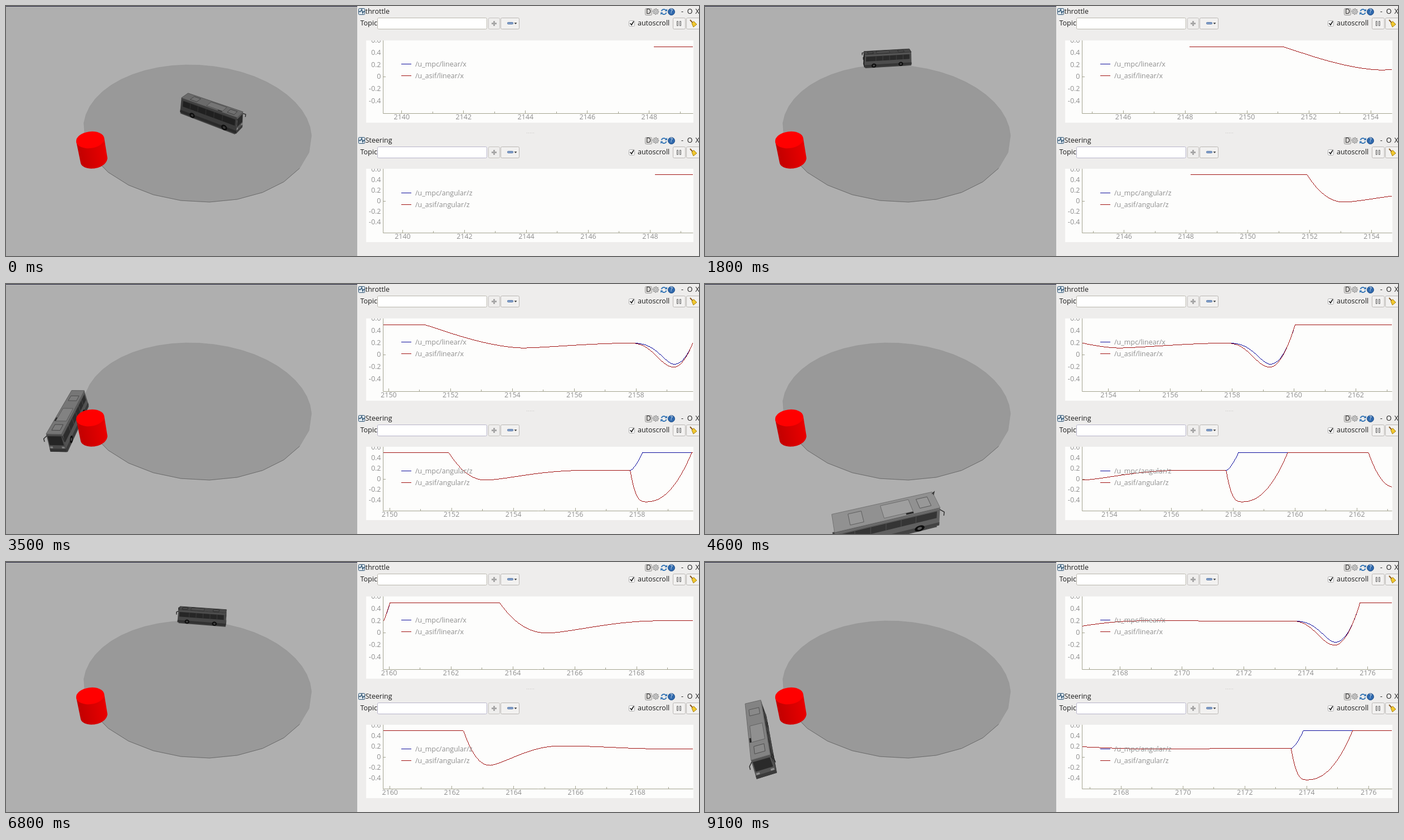
Recreate the animation shown at these times as an HTML page with a canvas. Size 1243 by 450 pixels, loop 9150 ms.

```html
<!DOCTYPE html>
<html>
<head>
<meta charset="utf-8">
<style>
html, body { margin: 0; width: 100%; height: 100%; overflow: hidden; background: #eeedec; }
canvas { display: block; }
</style>
</head>
<body>
<canvas id="stage" width="1243" height="450"></canvas>
<script>
const g = document.getElementById('stage').getContext('2d');
const LOOP = 9150, STEP = 50, TAU = 2 * Math.PI;
const FONT = '"Open Sans", "Noto Sans", sans-serif';

// ---------- helpers ----------
const grey = v => { v = Math.round(v); return `rgb(${v},${v},${v})`; };
const ring = (n, f) => Array.from({ length: n }, (_, k) => f(k * TAU / n, k));

function text(str, x, y, color = '#1c1c1c', align = 'left', size = 12.5) {
  g.font = `${size}px ${FONT}`;
  g.fillStyle = color;
  g.textAlign = align;
  g.textBaseline = 'middle';
  g.fillText(str, x, y);
}

function poly(points, fill, stroke, width = 1) {
  g.beginPath();
  points.forEach(([x, y]) => g.lineTo(x, y));
  g.closePath();
  if (fill) { g.fillStyle = fill; g.fill(); }
  if (stroke) { g.strokeStyle = stroke; g.lineWidth = width; g.stroke(); }
}

function line(points, color, width = 1) {
  g.beginPath();
  points.forEach(([x, y]) => g.lineTo(x, y));
  g.strokeStyle = color;
  g.lineWidth = width;
  g.stroke();
}

function box(x, y, w, h, fill, stroke, r = 2) {
  g.beginPath();
  g.roundRect(x + .5, y + .5, w, h, r);
  g.fillStyle = fill;
  g.fill();
  if (stroke) { g.strokeStyle = stroke; g.lineWidth = 1; g.stroke(); }
}

function clip(x, y, w, h) {
  g.save();
  g.beginPath();
  g.rect(x, y, w, h);
  g.clip();
}

// ---------- camera: unit height, pitched down ----------
const F = 543, CP = Math.cos(.6283), SP = Math.sin(.6283);

function project(x, z, h) {
  const depth = z * CP + (1 - h) * SP;
  return [315 + F * x / depth, 225 + F * ((1 - h) * CP - z * SP) / depth];
}

// ---------- bus route: time, ground x, ground z, heading ----------
const firstTurn = k => {
  const a = -.617 + 1.17 * k;
  return [350 * k, .434 + .46 * Math.sin(a), 1.857 - .46 * Math.cos(a), a];
};
const passObstacle = lap => [
  [2650, -.522, 1.853, 4.379],
  [3500, -.57, 1.215, 4.692],
  [3900, -.526, .938, 5.116]
].map(([t, x, z, a]) => [t + 5200 * lap, x, z, a + TAU * lap]);

const ROUTE = [
  ...[0, 1, 2, 3].map(firstTurn),
  [1800, .054, 2.285, 3.29],
  ...passObstacle(0),
  [4600, .02, .631, 6.543],
  [5800, .704, 1.668, 7.983],
  ...passObstacle(1)
];

// Cubic arcs whose tangent length follows the turn angle.
function pose(t) {
  const i = Math.max(1, ROUTE.findIndex(p => p[0] >= t));
  const [t0, x0, z0, a0] = ROUTE[i - 1], [t1, x1, z1, a1] = ROUTE[i];
  const s = (t - t0) / (t1 - t0);
  const m = Math.hypot(x1 - x0, z1 - z0) / Math.cos((a1 - a0) / 4) ** 2;
  const curve = (p, q, u, v) => {
    const b = 3 * (q - p) - 2 * u - v, c = 2 * (p - q) + u + v;
    return [p + s * (u + s * (b + s * c)), u + s * (2 * b + 3 * s * c)];
  };
  const [x, dx] = curve(x0, x1, m * Math.cos(a0), m * Math.cos(a1));
  const [z, dz] = curve(z0, z1, m * Math.sin(a0), m * Math.sin(a1));
  return { x, z, a: Math.atan2(dz, dx) };
}

// ---------- bus ----------
const LEN = .38, WID = .077, TALL = .11;

function drawBus(t) {
  const { x, z, a } = pose(t), c = Math.cos(a), s = Math.sin(a);
  const at = (l, w, h) => project(x + l * LEN * c - w * WID * s, z + l * LEN * s + w * WID * c, h * TALL);
  const rect = (f, u0, u1, v0, v1, fill, stroke) =>
    poly([f(u0, v0), f(u1, v0), f(u1, v1), f(u0, v1)], fill, stroke);
  const roof = (u, v) => at(u, v, 1);
  const top = 128 + 45 * (1 - z);

  rect((u, v) => at(u, v, 0), -.5, .48, -.5, .5, 'rgba(25,25,25,.7)');

  // sides and ends; u runs along the face, v upwards
  const faces = [
    ...[-1, 1].map(d => ({ n: [-s * d, c * d], side: true, f: (u, v) => at(u * (1 - .04 * v), d * (.5 - .05 * v), .07 + .93 * v) })),
    ...[-1, 1].map(d => ({ n: [c * d, s * d], front: d > 0, f: (u, v) => at(d * (.5 - .02 * v), u * (1 - .1 * v), .07 + .93 * v) }))
  ];
  for (const { n, side, front, f } of faces) {
    const reach = (side ? WID : LEN) / 2;
    if (n[0] * x + n[1] * z + reach >= 0) continue;
    const tone = 60 + 22 * n[0] - 14 * n[1] + 45 * Math.max(0, 1 - z);
    const pane = (u0, u1, v0, v1, k) => rect(f, u0, u1, v0, v1, grey(tone * k));
    pane(-.5, .5, 0, 1, 1);
    pane(-.5, .5, 0, .18, .7);
    if (side) {
      pane(-.46, .47, .46, .83, .55);
      for (let u = -.32; u < .4; u += .145) line([f(u, .46), f(u, .83)], grey(tone * .85));
      line([f(-.5, .92), f(.5, .92)], grey(tone * 1.25));
      for (const u of [-.27, .3]) {
        const wheel = r => ring(16, q => f(u + r * TALL / LEN * Math.cos(q), .1 + r * Math.sin(q)));
        poly(wheel(.17), '#0d0d0d');
        poly(wheel(.08), grey(tone * .9));
      }
    } else {
      pane(-.44, .44, front ? .38 : .5, .88, .5);
      if (front) for (const u of [-.45, .28]) pane(u, u + .17, .2, .3, 1.7);
    }
  }

  rect(roof, -.48, .48, -.45, .45, grey(top), grey(top * .8));
  rect(roof, -.34, -.22, -.28, .28, grey(top * 1.05), grey(top * .65));
  rect(roof, -.04, .23, -.33, .33, grey(top * 1.1), grey(top * .75));
  rect(roof, .3, .41, -.25, .25, grey(top * 1.05), grey(top * .6));
  rect(roof, .16, .23, -.42, -.34, '#262626');

  for (const w of [-1, 1]) line([at(.48, w * .45, .9), at(.515, w * .58, .85), at(.515, w * .6, .68)], '#2a2a2a', 1.4);
}

// ---------- scene ----------
// The far half of the field is smoother than the near half.
const FIELD = ring(50, (q, k) => [q + 1.466, k])
  .filter(([q, k]) => k % 2 === 0 || Math.sin(q) < 0)
  .map(([q]) => [343.5 + 204.5 * Math.cos(q), 229.5 + 123.5 * Math.sin(q + .07)]);
const NEAR_EDGE = FIELD.filter(p => p[1] > 270).sort((p, q) => p[0] - q[0]);

function drawCylinder() {
  const shade = g.createLinearGradient(128, 268, 180, 258);
  shade.addColorStop(0, '#c00000');
  shade.addColorStop(.6, '#da0000');
  shade.addColorStop(1, '#ea0000');
  g.beginPath();
  g.moveTo(126, 244);
  g.lineTo(134, 283);
  g.bezierCurveTo(138, 298, 179, 296, 182, 274);
  g.lineTo(176, 237);
  g.fillStyle = shade;
  g.fill();
  g.beginPath();
  g.ellipse(151, 241, 25.3, 15, -.13, 0, 7);
  g.fillStyle = '#ff0000';
  g.fill();
}

function drawScene(t) {
  clip(0, 0, 630, 450);
  g.fillStyle = '#afafaf';
  g.fillRect(0, 0, 630, 450);
  poly(FIELD, '#999', '#909090', .6);
  line(NEAR_EDGE, '#666', .9);
  drawBus(t);
  drawCylinder();
  g.fillStyle = '#20203a';
  g.fillRect(0, 0, 630, 1);
  g.restore();
}

// ---------- plotted signals ----------
// Each leg: end time in seconds after 2148, value reached, and the bends a, b of its easing.
const ease = (s, a = 1, b = 1) => 1 - (1 - s ** a) ** b;
const FIRST = .14, LAP = 15.72;

function signal(before, dodge, after) {
  const again = dodge.map(([u, ...leg]) => [u + LAP, ...leg]);
  const legs = [[FIRST, .5], ...before, ...dodge, ...after, ...again, [40, .5]];
  return u => {
    const i = Math.max(1, legs.findIndex(leg => leg[0] >= u));
    const [u0, v0] = legs[i - 1], [u1, v1, a, b] = legs[i];
    return v0 + (v1 - v0) * ease((u - u0) / (u1 - u0), a, b);
  };
}

const gas = dodge => signal(
  [[3.13, .5], [6.35, .115, 1.1, 1.7], [9.78, .194, 1.4, 1.9]], dodge,
  [[15.56, .5], [17.15, -.002, 1, 2.27], [20.8, .2, 1.4, 2.2], [25.5, .196]]);
const turn = dodge => signal(
  [[3.9, .5], [5.1, -.021, 1, 2.1], [9, .168, 1.5, 3.3], [9.76, .16]], dodge,
  [[14.36, .5], [15.23, -.158, 1, 2.2], [17.6, .21, 1.4, 2.4], [20.5, .156, 1.8, 1.8], [25.48, .16]]);

const PANELS = [
  {
    title: 'throttle', topic: 'linear/x', dy: 0, top: 62, base: 193, zero: 127.7, unit: 109.3, bottom: 210, lag: 0,
    mpc: gas([[11.22, -.152, 3, 2], [12.02, .5, 2.1]]),
    asif: gas([[11.22, -.2, 2.6, 2.5], [12.02, .5, 1.9]])
  },
  {
    title: 'Steering', topic: 'angular/z', dy: 232, top: 293, base: 408, zero: 351, unit: 95, bottom: 425, lag: .03,
    mpc: turn([[10.16, .5, 1.5]]),
    asif: turn([[10.29, -.432, 1, 3.1], [11.75, .5, 2.2]])
  }
];
const LEFT = 677, RIGHT = 1231.5, SEC = 55.5;
const BLUE = '#0a0a9c', RED = '#a01010', LABEL = '#8e8e8e', AXIS = '#a3a38f';

// Newest sample shown; scrolling starts after a short hold.
const newest = t => Math.max(1.4, 1.227 + 3.027 * t / 1000);

function drawIcons() {
  box(632, 4, 11, 11, '#dfe8ee', '#2c5170', 1);
  line([[633, 10], [636, 10], [638, 6], [640, 13], [641, 10], [643, 10]], '#2c5170', 1.3);
  box(1146, 4, 12, 12, '#dcdad8', '#999');
  text('D', 1152.5, 10.5, '#222', 'center');
  poly(ring(32, (q, k) => {
    const r = k % 4 < 2 ? 5.4 : 4;
    return [1165.5 + r * Math.cos(q), 10 + r * Math.sin(q)];
  }), '#c8c8c8', '#8a8a8a');
  poly(ring(12, q => [1165.5 + 1.6 * Math.cos(q), 10 + 1.6 * Math.sin(q)]), '#eee', '#8a8a8a');
  for (const q of [0, Math.PI]) {
    g.save();
    g.translate(1180, 10.5);
    g.rotate(q);
    g.beginPath();
    g.arc(0, 0, 4.5, 3.4, 5.7);
    g.strokeStyle = '#3475b5';
    g.lineWidth = 2;
    g.stroke();
    poly([[1.5, -1], [6, -1], [6, -5.5]], '#3475b5');
    g.restore();
  }
  box(1187, 4, 12, 12, '#2f69ad', '#244f86', 6);
  text('?', 1193.5, 10.5, '#fff', 'center', 10.5);
  [...'-OX'].forEach((mark, k) => text(mark, 1213 + 13.5 * k, 10.5, '#1c1c1c', 'center'));
}

function drawToolbar(p) {
  g.save();
  g.translate(0, p.dy);
  drawIcons();
  text(p.title, 644.5, 10.5);
  text('Topic', 635.5, 32);
  box(666, 21, 196, 20, '#fff', p.dy ? '#b6b3ca' : '#b9b6ac');
  box(865, 21, 20, 20, '#efeeed', '#c4c1be');
  line([[875.5, 27], [875.5, 36]], '#a8a8a8', 3);
  line([[871, 31.5], [880, 31.5]], '#a8a8a8', 3);
  box(887, 21, 33, 20, '#f2f1f0', '#b9b6b3');
  box(899, 29, 10, 3, '#8fabd4', '#47699c', 1);
  poly([[911.5, 30], [916.5, 30], [914, 33]], '#444');
  box(1117, 26, 10, 10, '#fff', '#aaa');
  line([[1119.5, 31], [1122, 34], [1126, 27.5]], '#222', 1.7);
  text('autoscroll', 1133, 32);
  box(1196, 21, 22, 20, '#f2f1f0', '#b9b6b3');
  for (const x of [1203, 1208]) box(x, 27, 2, 8, '#fff', '#666', 0);
  box(1220, 21, 24, 20, '#f2f1f0', '#b9b6b3');
  line([[1227, 25], [1231.5, 30]], '#8a5a20', 2);
  poly([[1230, 31], [1233.5, 27.5], [1239, 33], [1233, 38]], '#f0c830', '#a88010');
  g.restore();
}

function drawPlot(p, t) {
  const now = newest(t) - p.lag;
  const px = u => RIGHT + (u - now) * SEC, py = v => Math.floor(p.zero - v * p.unit);
  const zero = py(0) + .5;
  clip(646, p.top, 587, p.bottom - p.top);
  g.fillStyle = '#fdfdfc';
  g.fillRect(646, p.top, 587, p.bottom - p.top);

  for (const v of ['0.6', '0.4', '0.2', '0', '-0.2', '-0.4']) text(v, 672.5, p.zero - v * p.unit + .5, LABEL, 'right');
  line([[LEFT - .5, p.top], [LEFT - .5, p.base + .5], [RIGHT + 1, p.base + .5]], AXIS);
  line([[LEFT, zero], [LEFT + 4, zero]], AXIS);
  for (let u = Math.ceil(now - 10); u <= now; u++) {
    const x = Math.floor(px(u)) + .5, major = u % 2 === 0;
    line([[x, p.base], [x, p.base - (major ? 5 : 3)]], AXIS);
    if (major) text(2148 + u, px(u), p.base + 7.5, LABEL, 'center');
  }

  // one crisp pixel column at a time
  for (const [f, color] of [[p.mpc, BLUE], [p.asif, RED]]) {
    g.fillStyle = color;
    const start = Math.max(LEFT, Math.ceil(px(FIRST)));
    let last = py(f(now + (start - RIGHT) / SEC));
    for (let x = start; x < RIGHT; x++) {
      const y = py(f(now + (x - RIGHT) / SEC)), drop = y - last;
      g.fillRect(x, drop > 0 ? last + 1 : y, 1, Math.max(1, Math.abs(drop)));
      last = y;
    }
  }

  [['mpc', BLUE], ['asif', RED]].forEach(([name, color], k) => {
    const y = 105 + p.dy + 21 * k;
    g.fillStyle = color;
    g.fillRect(709, y - 1, 18, 1);
    text(`/u_${name}/${p.topic}`, 734, y + 1, LABEL);
  });
  g.restore();
}

function draw(t) {
  g.fillStyle = '#eeedec';
  g.fillRect(0, 0, 1243, 450);
  drawScene(t);
  for (const p of PANELS) {
    drawToolbar(p);
    drawPlot(p, t);
  }
  g.fillStyle = '#c2c0be';
  for (let x = 934; x < 947; x += 3) g.fillRect(x, 228, 1, 1);
}

const begin = performance.now();
function tick() {
  const t = Math.max(0, performance.now() - begin) % LOOP;
  draw(Math.floor(t / STEP) * STEP);
  requestAnimationFrame(tick);
}
tick();
</script>
</body>
</html>
```
